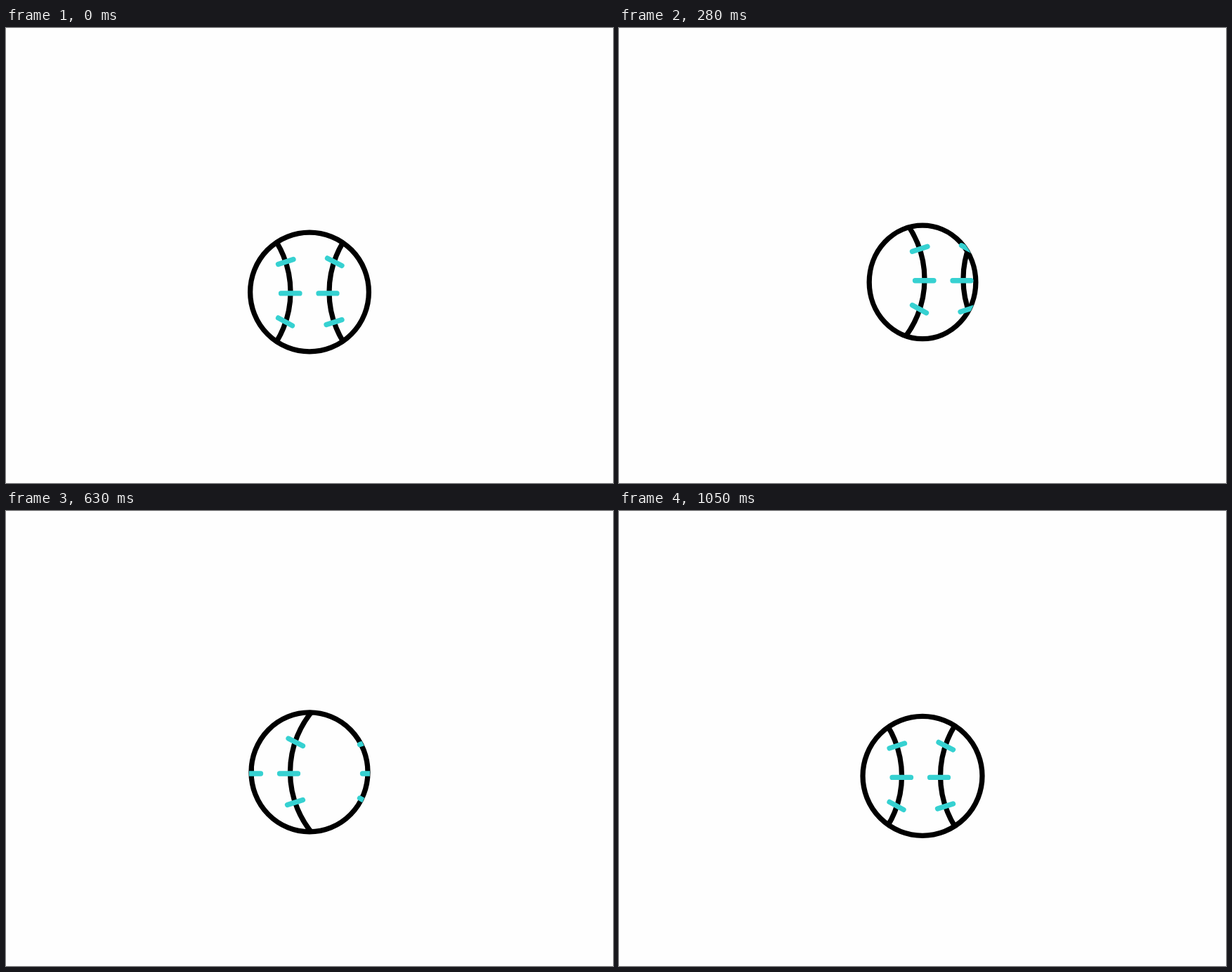
An HTML page with a canvas for the animation above (1610 ms loop, 864 by 648 pixels).

```html
<!DOCTYPE html>
<html lang="en">
<head>
<meta charset="utf-8">
<title>Bouncing baseball</title>
<style>
html, body { margin: 0; height: 100%; overflow: hidden; background: #fefefe; }
canvas { display: block; }
</style>
</head>
<body>
<canvas id="stage" width="864" height="648"></canvas>
<script>
const ctx = document.getElementById('stage').getContext('2d');
const LOOP = 1610, STEP = 70, LAST = 1050;
const GROUND = 466, CENTER = 432, PERIOD = 171.5, LINE = 7.3;

// Keys are [ms, value]
const SPIN = [[-210, -2], [0, 0], [210, 17.7], [420, 61.5], [630, 116], [770, 139], [910, 163.2], [1050, 169], [1190, 171]];
const WIDTH = [[0, 84.4], [210, 73.4], [420, 84], [560, 80], [630, 83], [700, 85], [1050, 85]];
const HEIGHT = [[0, 84.9], [210, 84.2], [350, 76], [420, 70.7], [490, 76], [560, 84.9], [630, 85], [1050, 85]];
// Start, end and height of each bounce
const HOPS = [[-40, 460, 24], [460, 670, 17], [720, 1050, 4]];
// x1, y1, x2, y2 of each stitch, y from the middle row
const STITCHES = [
  [387.5, -41.5, 409, -48.5], [391.5, 0, 418, 0], [387.5, 35, 407.5, 46],
  [457.5, -50, 478, -39.5], [445, 0, 471, 0], [456, 44.5, 478, 37.5]
];

// Smooth curve through the keys
function track(keys, t) {
  let i = 0;
  while (i < keys.length - 2 && t >= keys[i + 1][0]) i++;
  const slope = k => {
    const a = keys[Math.max(k - 1, 0)], b = keys[Math.min(k + 1, keys.length - 1)];
    return (b[1] - a[1]) / (b[0] - a[0]);
  };
  const [t0, v0] = keys[i], [t1, v1] = keys[i + 1];
  const d = t1 - t0, u = (t - t0) / d, w = 1 - u;
  return w * w * ((1 + 2 * u) * v0 + u * d * slope(i)) +
         u * u * ((1 + 2 * w) * v1 - w * d * slope(i + 1));
}

function bottomAt(t) {
  const hop = HOPS.find(([a, b]) => t >= a && t < b);
  if (!hop) return GROUND;
  const [a, b, h] = hop;
  return GROUND - h * Math.sin(Math.PI * (t - a) / (b - a)) ** 2;
}

function stroke(color, trace) {
  ctx.beginPath();
  trace();
  ctx.strokeStyle = color;
  ctx.stroke();
}

function drawSeams(x, y) {
  ctx.save();
  ctx.translate(x, y);
  stroke('#000', () => {
    ctx.arc(405 - 136, -2, 136, -0.75, 0.75);
    ctx.moveTo(460 + 136 - 136 * Math.cos(0.75), -2 + 136 * Math.sin(0.75));
    ctx.arc(460 + 136, -2, 136, Math.PI - 0.75, Math.PI + 0.75);
  });
  stroke('#36d1d1', () => {
    for (const [x1, y1, x2, y2] of STITCHES) {
      ctx.moveTo(x1, y1);
      ctx.lineTo(x2, y2);
    }
  });
  ctx.restore();
}

function draw(t) {
  const rx = track(WIDTH, t), ry = track(HEIGHT, t);
  const bottom = bottomAt(t), cy = bottom - LINE / 2 - ry;
  const oval = grow => ctx.ellipse(CENTER, cy, rx + grow, ry + grow, 0, 0, 2 * Math.PI);
  ctx.clearRect(0, 0, 864, 648);
  ctx.lineWidth = LINE;
  ctx.lineCap = 'round';
  stroke('#000', () => oval(0));
  ctx.save();
  ctx.beginPath();
  oval(LINE / 2 - 0.5);
  ctx.clip();
  const x = track(SPIN, t);
  drawSeams(x - PERIOD, bottom - 86.6);
  drawSeams(x, bottom - 86.6);
  ctx.restore();
}

const start = performance.now();
function tick() {
  const ms = (performance.now() - start) % LOOP;
  draw(Math.min(Math.floor(ms / STEP) * STEP, LAST));
  requestAnimationFrame(tick);
}
tick();
</script>
</body>
</html>
```
